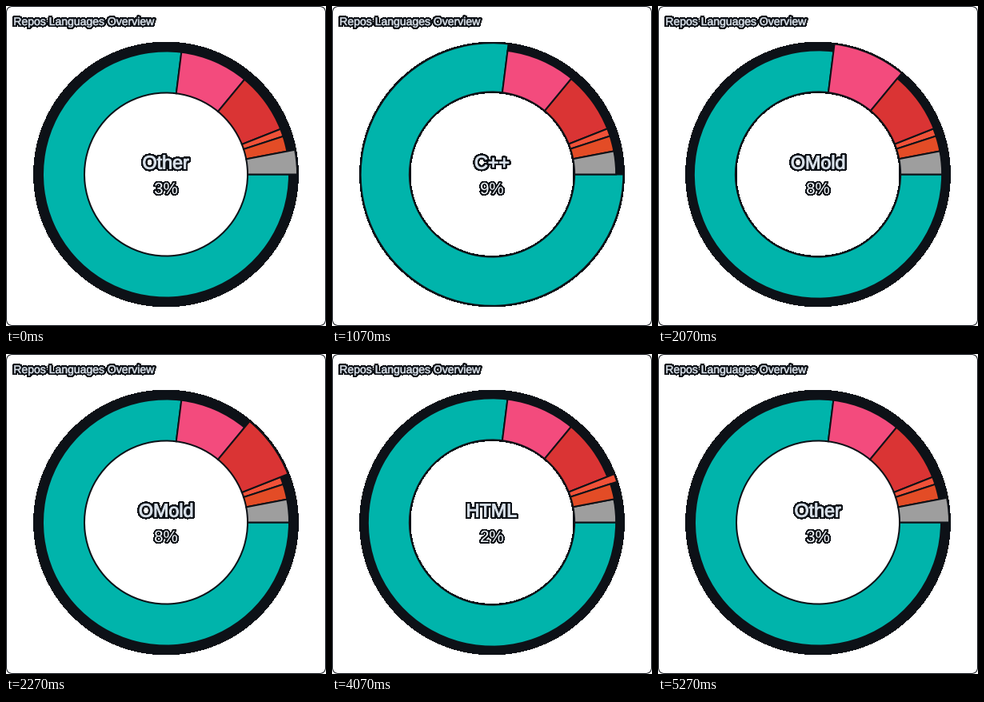
A matplotlib script for the animation above (5990 ms loop, 400 by 400 pixels).

```python
import matplotlib.pyplot as plt
from matplotlib.animation import FuncAnimation
from matplotlib.patches import Circle, FancyBboxPatch, PathPatch, Wedge
from matplotlib.textpath import TextPath
from matplotlib.transforms import Affine2D

SIZE, DPI = 400, 100
LOOP, TICK = 5990, 10
PX = 72 / DPI
CENTER = (200, 189.5)
R_IN, R_REST, R_FULL = 102, 154, 164
GROW, BULGE = R_FULL - R_REST, 5
DARK, LIGHT, PALE = "#0d1117", "#dbe3ec", "#f4f8fc"

# Slices run clockwise back to the positive x axis.
SLICES = [
    ("Fosk", 77, "#00b4ab"),
    ("C++", 9, "#f34b7d"),
    ("OMold", 8, "#da3434"),
    ("Nolet", 1, "#f05138"),
    ("HTML", 2, "#e34c26"),
    ("Other", 3, "#9e9e9e"),
]
FIRST, PERIOD = 70, 1000
STEP_STARTS = (0, 60, 130, 200)
PROGRESS = (0.06, 0.43, 0.77, 1)
QUICK = (0.06, 0.9, 1, 1)

fig = plt.figure(figsize=(SIZE / DPI, SIZE / DPI), dpi=DPI, facecolor="white")
ax = fig.add_axes([0, 0, 1, 1])
ax.set(xlim=(0, SIZE), ylim=(0, SIZE))
ax.axis("off")


def text_path(text, size, x, baseline, centered=True):
    path = TextPath((0, 0), text, size=size, prop={"family": "Liberation Sans"})
    box = path.get_extents()
    dx = x - (box.x0 + box.x1) / 2 if centered else x - box.x0
    return path.transformed(Affine2D().translate(dx, SIZE - baseline))


class Label:
    """Light lettering with a hard dark outline."""

    def __init__(self, path, halo, fill, weight):
        self.parts = [
            PathPatch(path, fc=DARK, ec=DARK, lw=halo * PX, joinstyle="round",
                      antialiased=False),
            PathPatch(path, fc=fill, ec=fill, lw=weight * PX, joinstyle="round"),
        ]
        for z, part in enumerate(self.parts):
            part.set_zorder(10 + z)
            ax.add_patch(part)

    def show(self, path):
        for part in self.parts:
            part.set_path(path)


ax.add_patch(FancyBboxPatch(
    (0.5, 0.5), SIZE - 1, SIZE - 1, fc="white", ec=DARK, lw=PX,
    boxstyle="round,pad=0,rounding_size=8"))
ax.add_patch(Circle(CENTER, 165.4, fc=DARK, ec="none", antialiased=False))
ax.add_patch(Circle(CENTER, 101, fc="white", ec="none", antialiased=False))

wedges = []
end = 360
for _, share, color in SLICES:
    start = end - share * 3.6
    wedge = Wedge(CENTER, R_REST, start, end, width=R_REST - R_IN,
                  fc=color, ec=DARK, lw=2 * PX, zorder=3)
    wedges.append(ax.add_patch(wedge))
    end = start

names = [text_path(name, 23.3, 200, 203.5) for name, _, _ in SLICES]
shares = [text_path(f"{share}%", 20.5, 200, 235) for _, share, _ in SLICES]

Label(text_path("Repos Languages Overview", 14, 10.5, 24, False), 3.8, LIGHT, 0.5)
name_label = Label(names[-1], 4.6, LIGHT, 1)
share_label = Label(shares[-1], 2.8, PALE, 0)


def state(t):
    """Return the active slice and how far it has taken over."""
    if t < FIRST:
        return len(SLICES) - 1, 1
    active, elapsed = divmod(t - FIRST, PERIOD)
    step = sum(elapsed >= s for s in STEP_STARTS) - 1
    return active, (QUICK if active == 3 else PROGRESS)[step]


def update(i):
    active, u = state(i * TICK)
    previous = (active - 1) % len(SLICES)
    swell = BULGE * 4 * u * (1 - u)
    for k, wedge in enumerate(wedges):
        lift = GROW * (u if k == active else 1 - u if k == previous else 0)
        radius = min(R_REST + lift + swell, R_FULL + 0.3)
        wedge.set_radius(radius)
        wedge.set_width(radius - R_IN - swell)
        wedge.set_zorder(4 if k == active else 3)
    name_label.show(names[active])
    share_label.show(shares[active])
    return []


anim = FuncAnimation(fig, update, frames=LOOP // TICK, interval=TICK,
                     init_func=lambda: update(0), repeat=True, repeat_delay=0,
                     blit=False, cache_frame_data=False)
plt.show()
```
